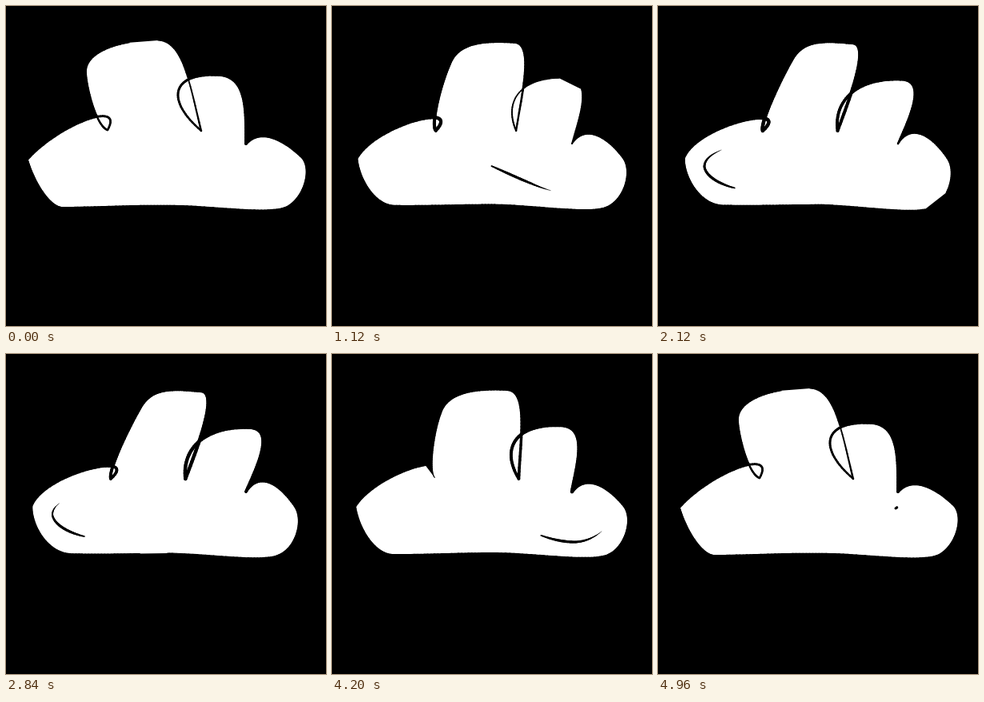
Write an HTML page with a canvas that moves like this. It is 400 px wide and 400 px high and loops after 5 s.

```html
<!DOCTYPE html>
<html lang="en">
<head>
<meta charset="utf-8">
<title>Cloud</title>
<style>
html, body { margin: 0; width: 100%; height: 100%; overflow: hidden; background: #000; }
canvas { display: block; width: 400px; height: 400px; }
</style>
</head>
<body>
<canvas id="stage" width="400" height="400"></canvas>
<script>
const ctx = document.getElementById('stage').getContext('2d');
const LOOP = 5000, STEP = 40, TURN = 4960, PEAK = 2520;
const GAP = 0.03;

const nums = s => s.trim().split(/[\s,]+/).map(Number);

// Chains of cubic curves: a start point, then three points per curve.
const wide = nums(`190,43
  222,44 230,100 244,156  200,118 206,85 262,86  302,85 300,130 300,172
  316,153 344,163 371,189  384,204 374,240 352,252  330,263 260,251 205,251
  165,250 110,253 70,253  55,252 36,225 26,192  64,149 149,116 127,155
  112,150 100,98 100,82  100,58 140,43 190,43`);
const leaning = nums(`244,46
  268,46 240,115 224,156  220,118 250,90 304,92  340,92 312,145 300,172
  314,149 338,156 361,190  373,207 363,242 342,251  325,261 262,251 208,249
  168,249 120,251 80,250  50,248 31,212 32,190  48,148 170,121 131,156
  128,146 152,96 168,68  182,42 205,42 244,46`);
const swirl = nums(`297,193
  312,182 349,182 348,207  342,222 322,235 303,235  284,235 265,229 247,221
  220,210 195,197 167,187  140,177 108,168 87,177  70,183 58,190 58,201
  60,214 80,224 98,228`);

// Turns a curve chain into points that carry their distance from the start.
function trace(c, n = 32) {
  const pts = [{ x: c[0], y: c[1], d: 0 }];
  for (let i = 0; i + 7 < c.length; i += 6) {
    for (let k = 1; k <= n; k++) {
      const t = k / n, r = 1 - t;
      const at = j => r * r * r * c[j] + 3 * r * r * t * c[j + 2] + 3 * r * t * t * c[j + 4] + t * t * t * c[j + 6];
      const last = pts[pts.length - 1], x = at(i), y = at(i + 1);
      pts.push({ x, y, d: last.d + Math.hypot(x - last.x, y - last.y) });
    }
  }
  return pts;
}

function pointAt(pts, d) {
  let i = 1;
  while (i < pts.length - 1 && pts[i].d < d) i++;
  const a = pts[i - 1], b = pts[i], f = (d - a.d) / (b.d - a.d || 1);
  return { x: a.x + (b.x - a.x) * f, y: a.y + (b.y - a.y) * f, d };
}

const cut = (pts, from, to) =>
  [pointAt(pts, from), ...pts.filter(p => p.d > from && p.d < to), pointAt(pts, to)];

// Strokes a line whose width depends on the share of its length.
function brush(pts, width) {
  const from = pts[0].d, len = pts[pts.length - 1].d - from;
  for (let i = 1; i < pts.length; i++) {
    const a = pts[i - 1], b = pts[i];
    ctx.lineWidth = width(((a.d + b.d) / 2 - from) / (len || 1));
    ctx.beginPath();
    ctx.moveTo(a.x, a.y);
    ctx.lineTo(b.x, b.y);
    ctx.stroke();
  }
}

function drawCloud(t) {
  const x = t < PEAK ? t / PEAK : (TURN - t) / (TURN - PEAK);
  const mix = x * (2 - x);
  const once = trace(wide.map((v, i) => v + (leaning[i] - v) * mix));
  const total = once[once.length - 1].d;
  const twice = once.concat(once.slice(1).map(p => ({ ...p, d: p.d + total })));
  const start = (t / TURN % 1) * total;
  const pts = cut(twice, start, start + total * (1 - GAP));

  ctx.fillStyle = '#fff';
  ctx.beginPath();
  pts.forEach(p => ctx.lineTo(p.x, p.y));
  ctx.fill();
  brush(pts, u => 1 + 3.4 * (1 - (1 - 2 * u) ** 2));
}

const swirlPts = trace(swirl);
const swirlLen = swirlPts[swirlPts.length - 1].d;

function drawSwirl(t) {
  const tail = 80, back = 4970;
  const x = t < PEAK ? t / PEAK : (back - t) / (back - PEAK);
  const head = x * (swirlLen + tail);
  const from = Math.max(0, head - tail), to = Math.min(swirlLen, head);
  if (to <= from) return;
  const dot = to - from < 4;
  brush(cut(swirlPts, from, to), u => dot ? 3 : 0.3 + 2.9 * Math.sin(Math.PI * 0.85 * u));
}

function frame() {
  const t = Math.floor(performance.now() % LOOP / STEP) * STEP;
  ctx.fillStyle = '#000';
  ctx.fillRect(0, 0, 400, 400);
  ctx.strokeStyle = '#000';
  ctx.lineCap = 'round';
  drawCloud(t);
  drawSwirl(t);
  requestAnimationFrame(frame);
}
frame();
</script>
</body>
</html>
```
